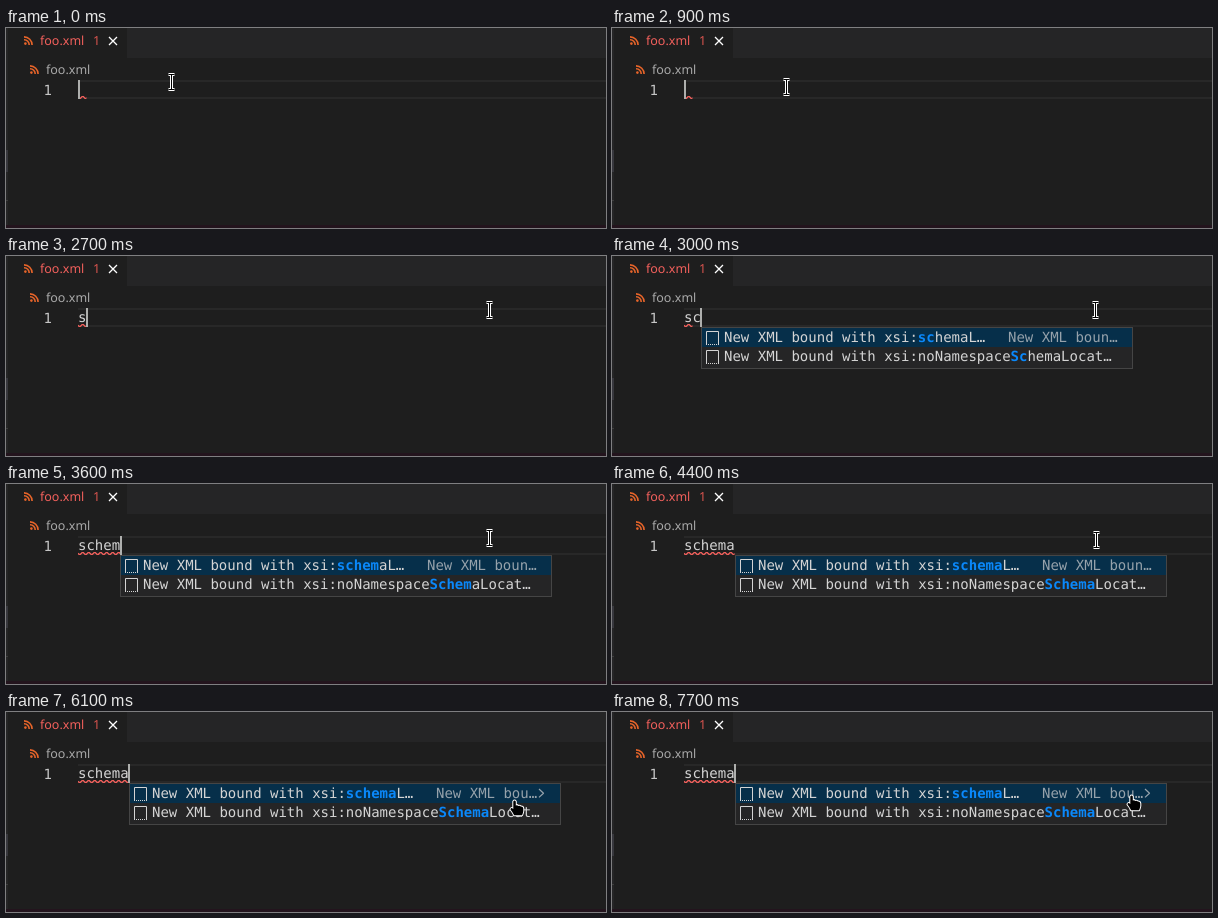
Write an HTML page with a canvas that moves like this. It is 600 by 200 pixels and loops after 8 s.

```html
<!DOCTYPE html>
<html lang="en">
<head>
<meta charset="utf-8">
<title>XML completion</title>
<style>
  html, body { margin: 0; width: 100%; height: 100%; overflow: hidden; background: #1e1e1e; }
  canvas { display: block; }
</style>
</head>
<body>
<canvas id="stage" width="600" height="200"></canvas>
<script>
const ctx = document.getElementById('stage').getContext('2d');
const LOOP = 8000, STEP = 100;
const CHAR = 14 * 0.602, ROW = 19, TEXT_X = 72, LINE_Y = 52, POPUP_Y = LINE_Y + ROW;
const MONO = '14px "DejaVu Sans Mono", monospace';
const SANS = '12.5px "Noto Sans", sans-serif';
const ERROR = '#f2605c', WHITE = '#ffffff', BLACK = '#000000', TEXT = '#d4d4d4';
const WORD = 'schema', TYPING_START = 2700, TYPING_TIME = 1000;

// Where the pointer rests first, then its eased moves; sag bends a move downwards.
const pointerHome = { x: 165.5, y: 54 };
const pointerMoves = [
  { from: 200, to: 600, x: 164, y: 57 },
  { from: 800, to: 1700, x: 479.5, y: 47, sag: 21 },
  { from: 1700, to: 1900, x: 483, y: 54 },
  { from: 4300, to: 4900, x: 503, y: 85 },
  { from: 5600, to: 5800, x: 507, y: 84 },
  { from: 6000, to: 6300, x: 514, y: 99 },
  { from: 7100, to: 7700, x: 519, y: 83 }
];

const suggestions = [
  { label: 'New XML bound with xsi:schemaL…', match: 23 },
  { label: 'New XML bound with xsi:noNamespaceSchemaLocat…', match: 34 },
  { label: 'New XML with SYSTEM DOCTYPE', match: 13 },
  { label: 'xml-stylesheet', match: 4 }
];

const clamp = k => Math.min(1, Math.max(0, k));
const ease = k => k * k * (3 - 2 * k);

function rect(x, y, w, h, color) {
  ctx.fillStyle = color;
  ctx.fillRect(x, y, w, h);
}

function text(str, x, y, color, font = MONO) {
  ctx.font = font;
  ctx.fillStyle = color;
  ctx.fillText(str, x, y);
}

function stroke(path, color, width) {
  ctx.strokeStyle = color;
  ctx.lineWidth = width;
  ctx.stroke(new Path2D(path));
}

function fill(path, color) {
  ctx.fillStyle = color;
  ctx.fill(new Path2D(path));
}

function at(x, y, draw) {
  ctx.save();
  ctx.translate(x, y);
  draw();
  ctx.restore();
}

function feedIcon(x, y) {
  at(x, y, () => {
    const orange = '#e8652a';
    ctx.fillStyle = orange;
    ctx.beginPath();
    ctx.arc(1.4, 7.6, 1.3, 0, 7);
    ctx.fill();
    stroke('M0 3.8A5 5 0 0 1 5.2 9M0 .9A8.1 8.1 0 0 1 8.1 9', orange, 1.6);
  });
}

function drawWindow() {
  rect(0, 0, 600, 200, '#1e1e1e');
  rect(121, 0, 479, 30, '#252526');
  rect(0, 0, 2, 197, '#252526');
  rect(0, 122, 2, 22, '#37373d');
  rect(0, 172, 2, 1, '#3c3c3c');
  rect(0, 197, 600, 3, '#23141d');

  feedIcon(18, 8);
  text('foo.xml', 34, 17, ERROR, SANS);
  text('1', 87, 17, '#d9544f', SANS);
  stroke('M103 9l8 8M111 9l-8 8', WHITE, 1.3);
  feedIcon(24, 37);
  text('foo.xml', 40, 46, '#a9a9a9', SANS);

  rect(TEXT_X, LINE_Y, 528, 2, '#282828');
  rect(TEXT_X, POPUP_Y - 2, 528, 2, '#282828');
  text('1', 37.5, 67, '#c6c6c6');
}

function squiggle(width) {
  at(TEXT_X, POPUP_Y - 3, () => {
    ctx.beginPath();
    ctx.rect(0, 0, width, 3);
    ctx.clip();
    let path = 'M0 1.3';
    for (let x = 0; x < width; x += 6) path += `l1.75 1.7l3 -3l1.25 1.3`;
    stroke(path, ERROR, 1.4);
  });
}

function snippetIcon(x, y) {
  at(x, y, () => {
    stroke('M.5 13V.5H12.5V13', TEXT, 1);
    for (let i = 0; i < 13; i += 2) rect(i, 13, 1, 1, TEXT);
  });
}

function drawPopup(left, count, rows, hovered) {
  const width = 432, height = rows * ROW + 4;
  rect(left, POPUP_Y, width, height, '#454545');
  rect(left + 1, POPUP_Y + 1, width - 2, height - 2, '#252526');
  rect(left + 1, POPUP_Y + 1, width - 2, ROW, '#062f4a');

  suggestions.slice(0, rows).forEach(({ label, match }, i) => {
    const x = left + 23, y = 86 + i * ROW, end = match + count;
    snippetIcon(left + 5, y - 11);
    text(label.slice(0, match), x, y, TEXT);
    text(label.slice(match, end), x + match * CHAR, y, '#0a88fa', 'bold ' + MONO);
    text(label.slice(end), x + end * CHAR, y, TEXT);
  });

  const dim = '#96a2ab';
  text(hovered ? 'New XML bou…' : 'New XML boun…', left + 307, 86, dim);
  if (hovered) stroke(`M${left + 410} 77l4.5 4.2l-4.5 4.2`, dim, 1.2);
}

function drawHand() {
  const hand = 'M-1.2 1.5Q0 -.5 1.3 1.5V5.5Q2.6 4.6 3.8 6Q5.2 5.2 6.3 6.6Q8.6 6.4 8.8 8.5V11Q8.6 13 7.6 15.2H-.3Q-1.6 12.5 -4 9.5Q-3.8 7 -1.2 9Z';
  stroke(hand, WHITE, 2);
  fill(hand, BLACK);
}

function drawArrow() {
  const arrow = 'M.5 .5V17L4.3 13.5L6.8 19.3L9.4 18.2L6.9 12.5H11.8Z';
  fill(arrow, BLACK);
  stroke(arrow, WHITE, 1.2);
}

function drawBeam() {
  const beam = 'M-3 -7.5H3M0 -7.5V7.5M-3 7.5H3';
  stroke(beam, WHITE, 3);
  stroke(beam, BLACK, 1);
}

function pointerAt(t) {
  let { x, y } = pointerHome;
  for (const move of pointerMoves) {
    const k = ease(clamp((t - move.from) / (move.to - move.from)));
    x += (move.x - x) * k;
    y += (move.y - y) * k + (move.sag || 0) * 4 * k * (1 - k);
  }
  return { x: Math.floor(x) + .5, y: Math.round(y) };
}

function typedCount(t) {
  if (t < TYPING_START) return 0;
  const k = clamp((t - TYPING_START) / TYPING_TIME);
  return 1 + Math.floor((WORD.length - 1) * k ** 1.2);
}

// The blink restarts with the last keystroke and stays lit while typing.
function caretVisible(t) {
  const typingEnd = TYPING_START + TYPING_TIME;
  if (t >= TYPING_START && t < typingEnd) return true;
  const phase = t < TYPING_START ? t + 400 : t - typingEnd;
  return phase % 1000 < 500;
}

function render(t) {
  const count = typedCount(t);
  const caretX = TEXT_X + count * CHAR;
  const popupOpen = t > TYPING_START;
  const { x, y } = pointerAt(t);
  const overPopup = popupOpen && y > POPUP_Y;

  drawWindow();
  text(WORD.slice(0, count), TEXT_X, 66, TEXT);
  squiggle(count < 3 ? CHAR : count * CHAR);
  if (caretVisible(t)) rect(Math.floor(caretX), LINE_Y, 2, ROW, '#aeafad');
  if (popupOpen) drawPopup(Math.round(caretX), count, count === 1 ? 4 : 2, overPopup && y <= POPUP_Y + ROW);
  at(x, y, overPopup ? drawHand : y < LINE_Y ? drawArrow : drawBeam);
}

ctx.textRendering = 'geometricPrecision';
ctx.lineJoin = 'round';
const start = performance.now();
function tick() {
  const t = (performance.now() - start) % LOOP;
  render(Math.floor(t / STEP) * STEP);
  requestAnimationFrame(tick);
}
tick();
</script>
</body>
</html>
```
